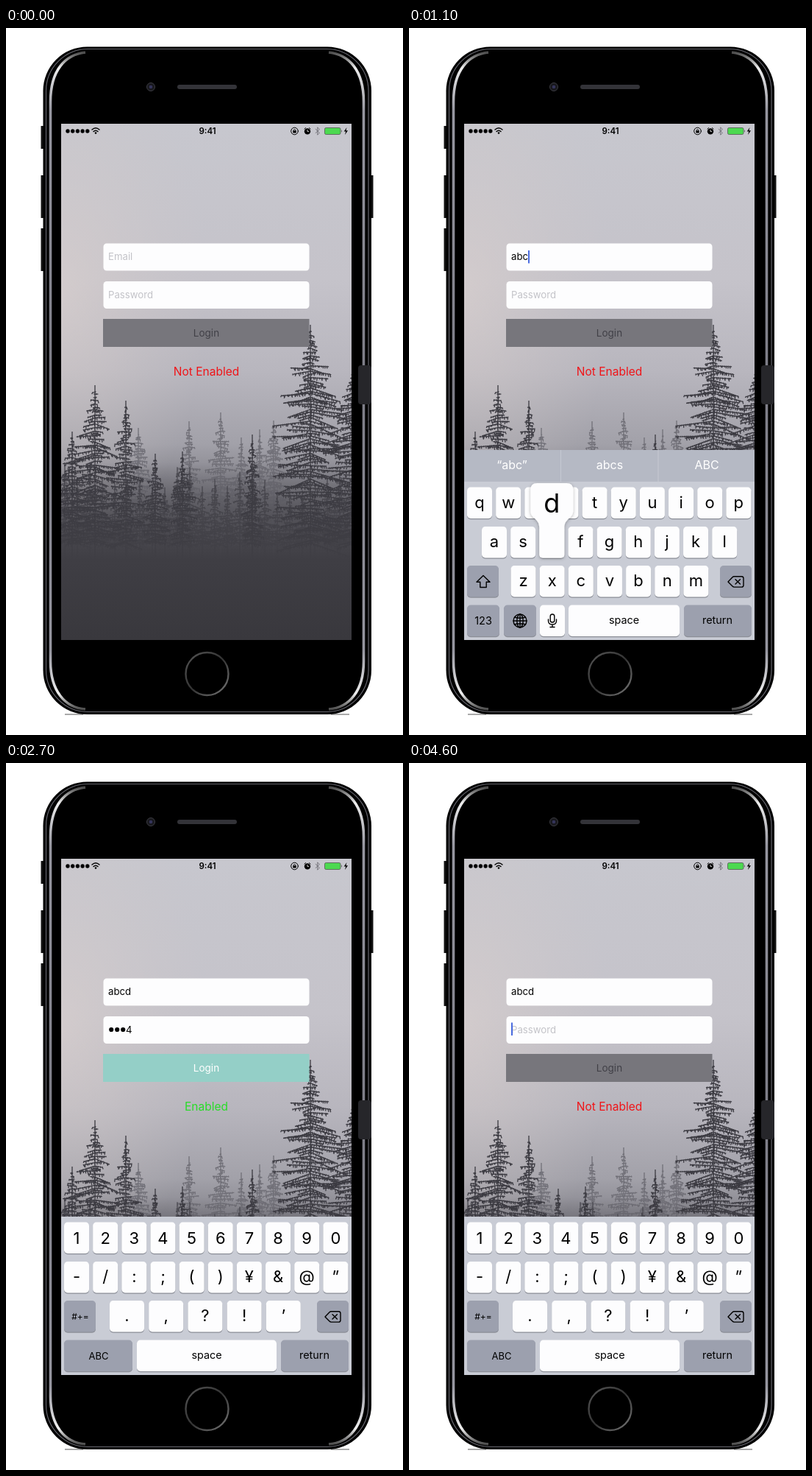
Animation of 540 by 960 pixels, one loop 4.7 s. Source, as an HTML page:

```html
<!DOCTYPE html>
<html lang="en">
<head>
<meta charset="utf-8">
<title>Login form</title>
<style>
  html, body { margin: 0; width: 100%; height: 100%; overflow: hidden; background: #fff; }
  svg { display: block; width: 540px; height: 960px; font-family: Inter, Roboto, sans-serif; }
  .mid { text-anchor: middle; }
  .line { fill: none; stroke: #000; stroke-width: 1.4; stroke-linejoin: round; stroke-linecap: round; }
  .thin { stroke-width: 1; }
</style>
</head>
<body>
<svg viewBox="0 0 540 960">
  <defs>
    <linearGradient id="sky" x2="0" y2="1">
      <stop offset="0" stop-color="#c7c7ce"/>
      <stop offset=".3" stop-color="#c5c3ca"/>
      <stop offset=".48" stop-color="#b8b6be"/>
      <stop offset=".62" stop-color="#a2a1a9"/>
      <stop offset=".76" stop-color="#6c6b72"/>
      <stop offset="1" stop-color="#46454b"/>
    </linearGradient>
    <radialGradient id="glow" cx="0" cy=".33" r=".5">
      <stop offset="0" stop-color="#dad0ce" stop-opacity=".65"/>
      <stop offset="1" stop-color="#cfc8c8" stop-opacity="0"/>
    </radialGradient>
    <linearGradient id="ground" x2="0" y2="1">
      <stop offset="0" stop-color="#3f3e44" stop-opacity="0"/>
      <stop offset=".55" stop-color="#3f3e44"/>
      <stop offset="1" stop-color="#39383d"/>
    </linearGradient>
    <linearGradient id="rim" gradientUnits="userSpaceOnUse" x1="0" y1="32" x2="0" y2="926">
      <stop offset="0" stop-color="#444"/>
      <stop offset=".025" stop-color="#eee"/>
      <stop offset=".09" stop-color="#9696a0"/>
      <stop offset=".5" stop-color="#7c7c86"/>
      <stop offset=".91" stop-color="#9696a0"/>
      <stop offset=".975" stop-color="#eee"/>
      <stop offset="1" stop-color="#444"/>
    </linearGradient>
    <linearGradient id="ring" x2="1" y2="1">
      <stop offset="0" stop-color="#555"/>
      <stop offset=".5" stop-color="#333"/>
      <stop offset="1" stop-color="#777"/>
    </linearGradient>
    <clipPath id="screen"><path d="M75 130H470V831H75z"/></clipPath>
    <filter id="soft"><feDropShadow dx="0" dy="1" stdDeviation="2" flood-opacity=".3"/></filter>
  </defs>

  <!-- phone -->
  <path d="M80 932H105M442 932H467" stroke="#aaa" stroke-width="2"/>
  <path d="M47.5 133h5v31h-5zM47.5 200h5v58h-5zM47.5 272h5v58h-5zM495 200h4.5v58h-4.5z" fill="#111"/>
  <rect x="50.5" y="25.5" width="446.5" height="906.5" rx="60"/>
  <rect x="54.5" y="28.5" width="438.5" height="900" rx="57" fill="none" stroke="#66666e" stroke-width="1.2"/>
  <g fill="none" stroke="url(#rim)" stroke-width="3.6">
    <path d="M108 33C80 36 60.5 58 60.5 100V860C60.5 900 80 923 108 925"/>
    <path d="M439 33C467 36 486.5 58 486.5 100V860C486.5 900 467 923 439 925"/>
  </g>
  <rect x="479" y="458" width="18" height="53" rx="4" fill="#26262a"/>
  <circle cx="197" cy="80" r="5.5" fill="#18181d" stroke="#3c3c42"/>
  <circle cx="197" cy="80" r="2.3" fill="#34345a"/>
  <rect x="233" y="77" width="81" height="6" rx="3" fill="#333338"/>
  <circle cx="273.5" cy="877" r="29" fill="none" stroke="url(#ring)" stroke-width="2.4"/>

  <g clip-path="url(#screen)">
    <path d="M75 130H470V831H75z" fill="url(#sky)"/>
    <path d="M75 130H470V831H75z" fill="url(#glow)"/>
    <g id="forest" fill="none"></g>
    <path d="M75 590H470V831H75z" fill="url(#ground)"/>

    <!-- status bar -->
    <path d="M84 140h0M90.7 140h0M97.4 140h0M104.1 140h0M110.8 140h0" stroke="#000" stroke-width="5.4" stroke-linecap="round"/>
    <path class="line" d="M117 138q5-4.6 10 0M119 140.6q3-2.6 6 0"/>
    <circle cx="122" cy="142.6" r="1.3"/>
    <text class="mid" x="274" y="144.2" font-size="11.5" font-weight="600">9:41</text>
    <circle class="line thin" cx="392.5" cy="140" r="4.8"/>
    <path d="M390.3 139.5h4.4v3h-4.4z"/>
    <path class="line thin" d="M391.2 139.5v-1q1.3-1.6 2.6 0v1"/>
    <circle cx="410" cy="140.4" r="4.2"/>
    <path class="line thin" d="M406 137l1.6-1.4M414 137l-1.6-1.4"/>
    <path d="M410 138v2.6h2" fill="none" stroke="#ccc"/>
    <path d="M420.8 137l5.6 5.4-2.7 2.8v-10.4l2.7 2.8-5.6 5.2" fill="none" stroke="#77767d"/>
    <rect x="433.5" y="135.5" width="21.5" height="9" rx="1.8" fill="#4cd950" stroke="#555" stroke-width=".8"/>
    <path d="M456 138.3q1.8 1.7 0 3.4z" fill="#444"/>
    <path d="M463.5 135l-3.8 5.6h2.5l-1.2 4.4 4-5.8h-2.6z"/>

    <!-- form -->
    <g fill="#fdfdfe">
      <rect x="132.5" y="292.5" width="280" height="37" rx="4.5"/>
      <rect x="132.5" y="344" width="280" height="37" rx="4.5"/>
    </g>
    <text id="email" x="139" y="315" font-size="13.2"></text>
    <g id="dots"></g>
    <text id="password" y="367" font-size="13.2"></text>
    <rect id="caret" width="2" height="17.5" fill="#4a6be0"/>
    <rect id="button" x="132" y="395" width="280.5" height="38"/>
    <text id="login" class="mid" x="272.5" y="419" font-size="13.5">Login</text>
    <text id="status" class="mid" x="272.5" y="471.7" font-size="15.5"></text>

    <!-- keyboard -->
    <g id="keyboard">
      <g id="bar">
        <path d="M75 573H470V616H75z" fill="#b5b9c4"/>
        <path d="M206.5 573v43M339 573v43" stroke="#c6c9d2"/>
        <g class="mid" fill="#fff" font-size="16">
          <text x="140" y="599"></text><text x="273" y="599"></text><text x="405" y="599"></text>
        </g>
      </g>
      <path d="M75 616H470V831H75z" fill="#c9ccd5"/>
      <g id="letters"></g>
      <g id="numbers"></g>
      <g id="emailRow"></g>
      <g id="plainRow"></g>
      <g id="common"></g>
      <g id="popup"></g>
    </g>
  </g>
</svg>
<script>
const LOOP = 4700, STEP = 100, BLINK = 200;
const ROWS = [623.5, 677, 730, 783.5];
const $ = id => document.getElementById(id);
const show = (id, on) => $(id).setAttribute('display', on ? 'inline' : 'none');

// forest
let seed = 7;
const rnd = (a = 0, b = 1) => a + (b - a) * (seed = seed * 16807 % 2147483647) / 2147483647;

// a bare tip, then ragged branches hung with needles
function tree(x, top, slope, reach, color) {
  let d = `M${x} ${top}V740`;
  for (let y = top + 9; y < 700; y += rnd(2.5, 5.5))
    for (const side of [-1, 1]) {
      const len = Math.min((y - top) * slope, reach) * rnd(.25, 1.15);
      const drop = len * rnd(-.1, .45);
      d += `M${x} ${y.toFixed(1)}l${(side * len).toFixed(1)} ${drop.toFixed(1)}`;
      for (let at = rnd(0, 3); at < len; at += 2.6)
        d += `M${(x + side * at).toFixed(1)} ${(y + drop * at / len - 1).toFixed(1)}` +
          `l${rnd(-2, 2).toFixed(1)} ${rnd(2, 5).toFixed(1)}`;
    }
  return `<path d="${d}" stroke="${color}" stroke-width="1.3"/>`;
}

const far = [[180, 543, .3, 22], [249, 534, .24, 18], [292, 522, .26, 24],
  [320, 556, .24, 15], [345, 545, .24, 17], [364, 533, .25, 20]];
const near = [[121, 485, .33, 36], [163, 506, .25, 24], [90, 548, .3, 24], [203, 578, .25, 18],
  [240, 575, .25, 18], [335, 552, .16, 14], [414, 403, .4, 46], [472, 462, .4, 36]];
let forest = far.map(t => tree(...t, '#717078')).join('');
for (let x = 80; x < 475; x += 17) forest += tree(x, 588 + rnd(0, 42), .26, 20, '#4c4b52');
$('forest').innerHTML = forest + near.map(t => tree(...t, '#3b3a41')).join('');

// keyboard
const label = (x, y, size, s) => `<text class="mid" x="${x}" y="${y}" font-size="${size}">${s}</text>`;

function key(x, row, w, dark, inside = '') {
  const box = (dy, fill) =>
    `<rect x="${x}" y="${ROWS[row] + dy}" width="${w}" height="42.5" rx="4.8" fill="${fill}"/>`;
  return box(1.2, '#8b8e97') + box(0, dark ? '#9ca0ae' : '#fdfdfe') + inside;
}

const keyX = {};
function keys(chars, row, first, pitch = 39.15, w = 34) {
  return [...chars].map((c, i) => {
    const x = first + pitch * i;
    keyX[c] = [x, row];
    return key(x - w / 2, row, w, false, label(x, ROWS[row] + (/\d/.test(c) ? 29.5 : 28), 22, c));
  }).join('');
}

const globe = `<g class="line"><circle cx="151" cy="805" r="9"/><ellipse cx="151" cy="805" rx="4.2" ry="9"/>
  <path d="M142 805h18M151 796v18M143.5 800q7.5 2.5 15 0M143.5 810q7.5-2.5 15 0"/></g>`;
const mic = `<g class="line"><rect x="192.2" y="796" width="5.6" height="11" rx="2.8"/>
  <path d="M189.5 803v2q0 5 5.5 5t5.5-5v-2M195 810v3.5M192 813.5h6"/></g>`;
const shift = '<path class="line" d="M101 743.5l9 8.8h-4.8v7.2h-8.4v-7.2h-4.8z"/>';
const erase = `<path class="line" d="M434 752l6-6.3q1-1 2.3-1h10q2.7 0 2.7 2.7v9q0 2.7-2.7 2.7h-10q-1.3 0-2.3-1z
  M444 748.7l6.4 6.4M450.4 748.7l-6.4 6.4"/>`;

$('letters').innerHTML = keys('qwertyuiop', 0, 96) + keys('asdfghjkl', 1, 116) +
  keys('zxcvbnm', 2, 155.5) + key(79, 2, 43, true, shift);
$('numbers').innerHTML = keys('1234567890', 0, 96) + keys('-/:;()¥&@”', 1, 96) +
  keys('.,?!’', 2, 164.5, 53.2, 47) + key(79, 2, 43, true, label(101, 756, 12, '#+='));
$('emailRow').innerHTML = key(79, 3, 44, true, label(101, 809.5, 14.5, '123')) +
  key(129, 3, 44, true, globe) + key(178, 3, 34, false, mic) +
  key(217, 3, 151, false, label(292.5, 808.5, 14.4, 'space'));
$('plainRow').innerHTML = key(79, 3, 93, true,
  '<text id="mode" class="mid" x="126" y="809.5" font-size="14"></text>') +
  key(178, 3, 190, false, label(273, 808.5, 14.4, 'space'));
$('common').innerHTML = key(423, 2, 43, true, erase) +
  key(374, 3, 92, true, label(419.5, 808.5, 14.4, 'return'));
const eraseKey = $('common').querySelectorAll('rect')[1];

function bubble(c) {
  const [x, row] = keyX[c], y = ROWS[row];
  const mid = Math.max(x, 108), l = mid - 29, r = mid + 29, kl = x - 17, kr = x + 17;
  return `<path filter="url(#soft)" fill="#fdfdfe" d="M${l + 9} ${y - 59}H${r - 9}q9 0 9 9V${y - 22}
    C${r} ${y - 10} ${kr} ${y - 12} ${kr} ${y + 2}V${y + 38}q0 4.5-4.5 4.5H${kl + 4.5}q-4.5 0-4.5-4.5
    V${y + 2}C${kl} ${y - 12} ${l} ${y - 10} ${l} ${y - 22}V${y - 50}q0-9 9-9z"/>` +
    label(mid, y - 19.5, 36, c);
}

// what happens when; `edit` restarts the caret blink
const events = [
  [0, { email: '', pass: '', focus: '', pop: '', del: false, nums: false, edit: 0 }],
  [100, { focus: 'email', edit: 100 }],
  [1400, { focus: 'pass', edit: 1400 }],
  [1700, { nums: true }]
];
function type(field, text, start) {
  [...text].forEach((c, i) => {
    const t = start + i * 200;
    events.push([t, { pop: c }], [t + 100, { pop: '', [field]: text.slice(0, i + 1), edit: t + 100 }]);
  });
}
type('email', 'abcd', 500);
type('pass', '1234', 1800);
for (let left = 3; left >= 0; left--) {
  const t = 3800 + (3 - left) * 200;
  events.push([t, { del: true }], [t + 100, { del: false, pass: '•'.repeat(left), edit: t + 100 }]);
}
events.sort((a, b) => a[0] - b[0]);

const hints = {
  '': ['I', 'The', 'I’m'], a: ['“a”', 'apple', 'and'], ab: ['“ab”', 'about', 'able'],
  abc: ['“abc”', 'abcs', 'ABC'], abcd: ['“abcd”', 'abcde', 'ABCD']
};

function field(id, text, hint) {
  $(id).textContent = text || hint;
  $(id).setAttribute('fill', text ? '#000' : '#c3c3c8');
}

function draw(t) {
  const s = Object.assign({}, ...events.filter(e => e[0] <= t).map(e => e[1]));
  const onEmail = s.focus === 'email';

  // every password character but a freshly typed last one is a dot
  const hidden = s.pass.endsWith('•') ? s.pass.length : Math.max(0, s.pass.length - 1);
  const passX = 139 + hidden * 8;
  field('email', s.email, 'Email');
  field('password', s.pass.slice(hidden), s.pass ? '' : 'Password');
  $('password').setAttribute('x', passX);
  $('dots').innerHTML = Array.from({ length: hidden },
    (_, i) => `<circle cx="${143.2 + i * 8}" cy="362" r="3.1"/>`).join('');

  const text = onEmail ? $('email') : $('password');
  const typed = onEmail ? s.email : s.pass.slice(hidden);
  const caretX = (onEmail ? 139 : passX) + (typed ? text.getComputedTextLength() : 0);
  $('caret').setAttribute('x', caretX);
  $('caret').setAttribute('y', onEmail ? 302 : 352.5);
  show('caret', s.focus && Math.floor((t - s.edit) / BLINK) % 2 === 0);

  const ok = s.email.length > 3 && s.pass.length > 3;
  $('button').setAttribute('fill', ok ? '#94cfc7' : '#77767c');
  $('login').setAttribute('fill', ok ? '#fff' : '#414047');
  $('status').textContent = ok ? 'Enabled' : 'Not Enabled';
  $('status').setAttribute('fill', ok ? '#28dc28' : '#f01418');

  const rise = Math.min(1, t / 400);
  $('keyboard').setAttribute('transform', `translate(0 ${258 * (1 - rise) ** 2})`);
  show('bar', onEmail);
  show('emailRow', onEmail);
  show('plainRow', !onEmail);
  show('letters', !s.nums);
  show('numbers', s.nums);
  $('mode').textContent = s.nums ? 'ABC' : '123';
  $('mode').setAttribute('font-size', s.nums ? 13 : 14.5);
  $('bar').querySelectorAll('text').forEach((el, i) => el.textContent = hints[s.email][i]);
  eraseKey.setAttribute('fill', s.del ? '#fdfdfe' : '#9ca0ae');
  $('popup').innerHTML = s.pop ? bubble(s.pop) : '';
}

let last = -1;
function tick() {
  const t = Math.floor(performance.now() % LOOP / STEP) * STEP;
  if (t !== last) draw(last = t);
  requestAnimationFrame(tick);
}
tick();
</script>
</body>
</html>
```
